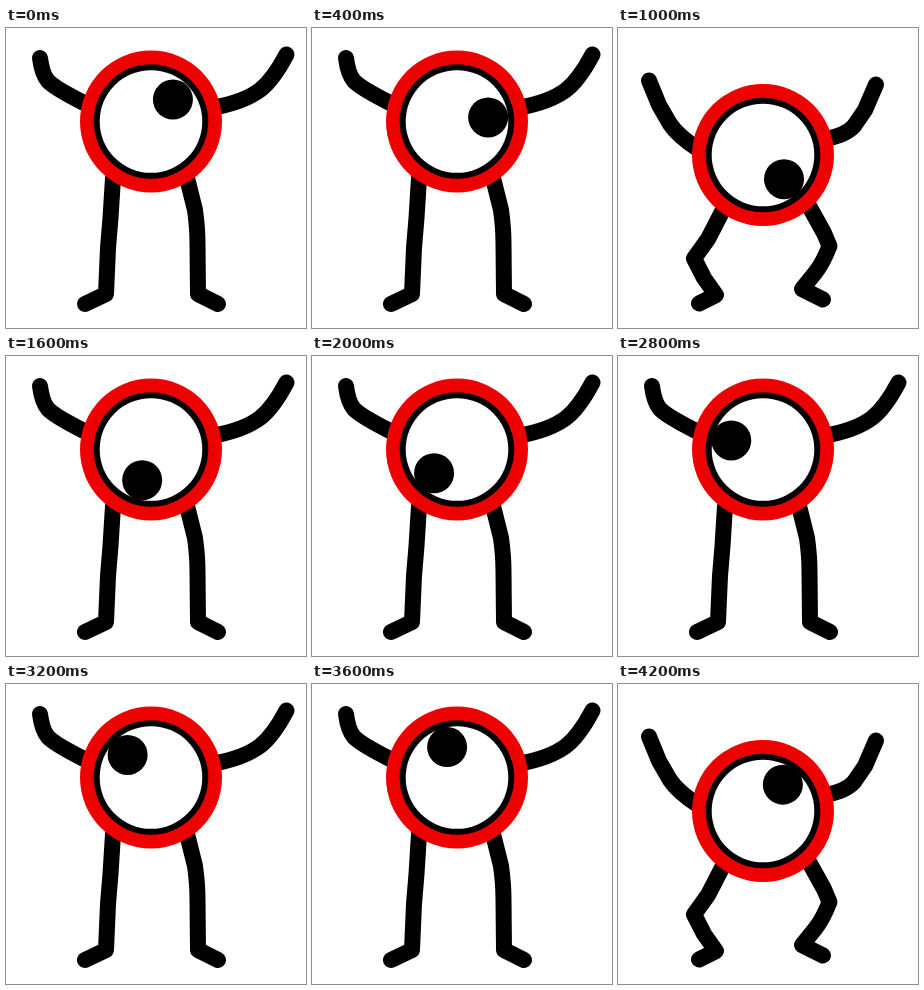
These frames come from a looping animation (300x300 px, 4.4 s). An HTML page:

```html
<!DOCTYPE html>
<html lang="en">
<head>
<meta charset="utf-8">
<title>Dancing eye</title>
<style>
  html, body { margin: 0; height: 100%; overflow: hidden; background: #fff; }
  svg { display: block; width: 100vw; height: 100vh; }
  path { fill: none; stroke: #000; stroke-width: 16; stroke-linecap: round; stroke-linejoin: round; }
</style>
</head>
<body>
<svg viewBox="0 0 300 300">
  <g id="stretch">
    <path d="M34 30 Q36 46 42 53 Q48 60 84 78"/>
    <path d="M280.5 26.5 Q267 52 254 62 Q238 74 208 79.5"/>
    <path d="M107 150 L104.500 190 L102 220 L100 266 L79 276"/>
    <path d="M181 150 L189 182 Q191.500 200 191.500 215 L192 266 L212 276"/>
  </g>
  <g id="crouch">
    <path d="M31 52.500 L41 77 L52 96 Q60 108 80 121"/>
    <path d="M258 56.500 L247 82 L236 98 Q228 107 208 111"/>
    <path d="M106 180 L90 211 L76 230.500 L86 250 L98 267 L81 275.500"/>
    <path d="M191 178 L206 205 L211.500 218 Q205 235 197 245 L184 261 L205 271.500"/>
  </g>
  <g id="eye">
    <circle r="71" fill="#ef0000"/>
    <circle r="57.3"/>
    <circle r="51.3" fill="#fff"/>
    <circle id="pupil" r="20"/>
  </g>
</svg>
<script>
  const STEP = 200, STEPS = 22;
  const [stretch, crouch, eye, pupil] =
    ['stretch', 'crouch', 'eye', 'pupil'].map(id => document.getElementById(id));

  // Pupil orbit: [step, angle in degrees, radius]
  const orbit = [
    [0, -45, 31], [5, 49, 32], [8, 106, 32], [10, 134, 33],
    [14, 196, 33], [18, 252, 32], [21, 307, 33], [22, 315, 31]
  ];

  function orbitAt(step) {
    const i = orbit.findIndex(p => p[0] > step);
    const a = orbit[i - 1], b = orbit[i];
    const t = (step - a[0]) / (b[0] - a[0]);
    return [1, 2].map(n => a[n] + (b[n] - a[n]) * t);
  }

  function draw(now) {
    const step = Math.floor(now / STEP) % STEPS;
    const down = step % 2 === 1;
    const [angle, radius] = orbitAt(step);
    stretch.style.display = down ? 'none' : '';
    crouch.style.display = down ? '' : 'none';
    eye.setAttribute('transform', `translate(145 ${down ? 127 : 93.5})`);
    pupil.setAttribute('cx', radius * Math.cos(angle * Math.PI / 180));
    pupil.setAttribute('cy', radius * Math.sin(angle * Math.PI / 180));
  }

  const start = performance.now();
  function tick() {
    draw(performance.now() - start);
    requestAnimationFrame(tick);
  }
  tick();
</script>
</body>
</html>
```
